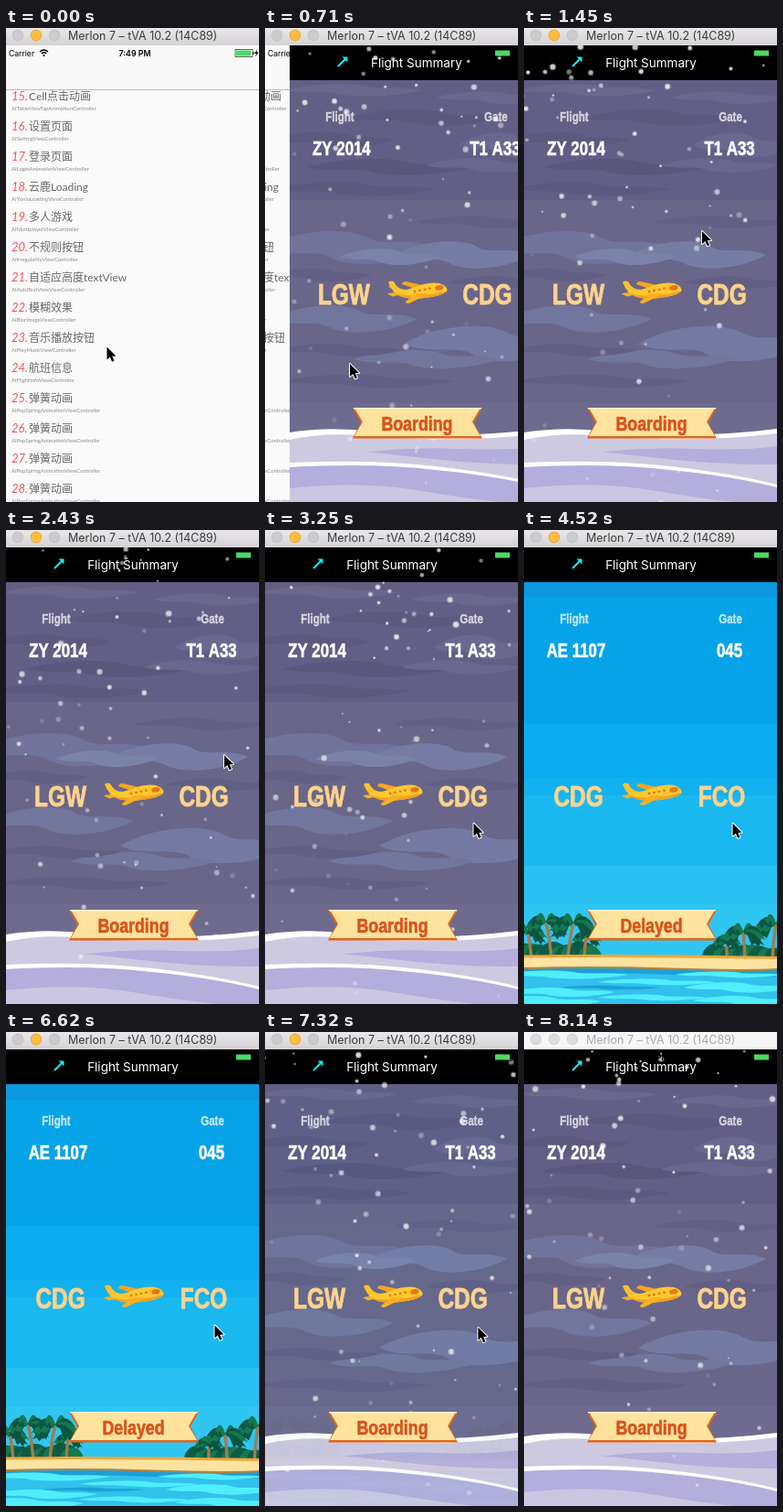
Recreate the animation shown at these times as an HTML page with a canvas. Size 277x518 px, loop 8240 ms.

```html
<!DOCTYPE html>
<html lang="zh">
<head>
<meta charset="utf-8">
<title>Flight Summary</title>
<style>
html, body { margin: 0; width: 100%; height: 100%; overflow: hidden; background: #fafafa; }
canvas { display: block; width: 277px; height: 518px; }
</style>
</head>
<body>
<canvas id="stage" width="277" height="518"></canvas>
<script>
const W = 277, H = 518, LOOP = 8240;
const stage = document.getElementById('stage').getContext('2d');
let g = stage;

const SANS = '"Liberation Sans", Arial, sans-serif';
const UI = 'Inter, sans-serif';
const LIST = 'Lato, "Noto Sans CJK SC", "Noto Sans CJK", sans-serif';
const NARROW = 0.78;   // one condensed face for all flight labels

const clamp = v => Math.max(0, Math.min(1, v));
const easeIn = p => p * p;
const easeOut = p => 1 - (1 - p) ** 2;
const easeInOut = p => p * p * (3 - 2 * p);
const rand = n => { const s = Math.sin(n * 127.1 + 11.7) * 43758.5453; return s - Math.floor(s); };

function rect(color, x, y, w, h) { g.fillStyle = color; g.fillRect(x, y, w, h); }
function shape(color, d) { g.fillStyle = color; g.fill(new Path2D(d)); }
function line(color, width, d) { g.strokeStyle = color; g.lineWidth = width; g.stroke(new Path2D(d)); }
function dot(color, x, y, r) { g.fillStyle = color; g.beginPath(); g.arc(x, y, r, 0, 7); g.fill(); }
function text(s, x, y, font, color, align = 'left') {
  g.font = font; g.fillStyle = color; g.textAlign = align; g.textBaseline = 'alphabetic';
  g.fillText(s, x, y);
}
function layer(paint) {
  const c = document.createElement('canvas');
  c.width = W; c.height = H;
  g = c.getContext('2d');
  paint();
  g = stage;
  return c;
}

// ---- Wintry and sunny backgrounds ----
function streak(color, x, y, w, h) {
  const l = x - w / 2, r = x + w / 2;
  shape(color, `M${l} ${y} C${l + w * .2} ${y - h * .65} ${x} ${y - h * .7} ${x + w * .1} ${y - h * .35}
    S${r - w * .15} ${y - h * .4} ${r} ${y} C${r - w * .2} ${y + h * .65} ${x} ${y + h * .7} ${x - w * .1} ${y + h * .35}
    S${l + w * .15} ${y + h * .4} ${l} ${y}Z`);
}

const winter = layer(() => {
  rect('#625e85', 0, 57, W, 131);
  rect('#696689', 0, 188, W, 221);
  rect('#6e6b8f', 0, 409, W, 109);
  [['#6b678d', 70, 68, 150, 12], ['#6b678d', 225, 76, 130, 12],
   ['#5c587e', 150, 98, 170, 16], ['#5c587e', 50, 122, 130, 15], ['#6b6890', 240, 128, 110, 24],
   ['#5a567c', 110, 152, 180, 16], ['#6a678e', 215, 150, 130, 14], ['#5c587e', 70, 176, 180, 13],
   ['#636085', 215, 212, 150, 12],
   ['#72739a', 65, 240, 190, 32], ['#777ca4', 190, 248, 150, 26], ['#7b82a8', 110, 250, 110, 16],
   ['#625f84', 35, 270, 110, 13], ['#625f84', 235, 278, 120, 12],
   ['#73769c', 60, 318, 160, 26], ['#747aa1', 220, 345, 190, 34], ['#73769c', 150, 362, 160, 18],
   ['#625f84', 55, 352, 140, 12], ['#625f84', 85, 386, 190, 13]].forEach(s => streak(...s));
  shape('#fff', 'M0 442 Q45 435 90 441 Q180 450 277 438 V518 H0Z');
  shape('#cdc9e1', 'M0 450 Q40 441 90 446 Q190 454 277 443 V518 H0Z');
  shape('#b3aedb', 'M30 472 Q110 456 190 460 Q240 462 277 457 V500 H0 Q20 476 30 472Z');
  shape('#cdc9e1', 'M0 462 Q60 459 130 468 Q210 478 277 477 V500 H0Z');
  shape('#fff', 'M0 475 Q90 471 160 479 Q230 487 277 499 V518 H0Z');
  shape('#b3aedb', 'M0 480 Q90 475 160 483 Q230 490 277 502 V518 H0Z');
  shape('#cbc7e2', 'M0 503 Q80 494 145 506 Q185 513 230 518 H0Z');
  rect('#000', 0, 19, W, 38);
});

function palm(x, base, top, lean, size) {
  const cx = x + lean;
  line('#a37b4b', 3.4, `M${x} ${base} Q${x + lean * .2} ${(base + top) / 2} ${cx} ${top}`);
  for (let i = 0; i < 9; i++) {
    const a = Math.PI * (1.12 - i * .155), dx = Math.cos(a) * size, up = Math.sin(a) * size * .5;
    const ex = cx + dx, ey = top - up + size * .42;
    shape(i % 2 ? '#15784f' : '#0b5642', `M${cx} ${top} Q${cx + dx * .5} ${top - up - size * .3} ${ex} ${ey}
      L${cx + dx * .82} ${ey - size * .08} L${cx + dx * .7} ${ey + size * .08} L${cx + dx * .55} ${ey - size * .1}
      L${cx + dx * .4} ${ey} L${cx + dx * .2} ${top + size * .15}Z`);
  }
}
function bushes(from, to, height) {
  for (let x = from, i = 0; x <= to; x += 8, i++)
    dot(i % 2 ? '#15784f' : '#0d5c45', x, 467, height * (.65 + .35 * rand(i + from)));
}

const summer = layer(() => {
  [[57, '#0c98df'], [74, '#06a3e8'], [212, '#0cadf0'], [271, '#13b1ef'], [290, '#19b8f1'],
   [367, '#27c0f1'], [409, '#2fc6f2']].forEach(([y, c]) => rect(c, 0, y, W, H - y));
  bushes(0, 76, 17);
  bushes(210, 277, 15);
  [[8, 468, 438, -4, 22], [30, 468, 428, -6, 25], [66, 468, 444, 2, 17], [48, 468, 429, 6, 27],
   [222, 468, 448, 0, 17], [272, 468, 430, 4, 27], [242, 468, 439, -2, 25]].forEach(p => palm(...p));
  shape('#f2a63a', 'M0 464.500 Q100 463 277 466 V485 H0Z');
  shape('#fce4a0', 'M0 467.500 Q100 466 277 469 V485 H0Z');
  shape('#b9813d', 'M0 478 Q80 476 160 478.500 T277 479 V490 H0Z');
  shape('#1c9fd6', 'M0 480 Q80 478 160 480.500 T277 481 V518 H0Z');
  shape('#31c1ec', 'M0 487 Q80 482 160 486 T277 488 V518 H0Z');
  [[40, 486, 150, 8], [225, 486, 120, 6], [145, 494, 130, 6], [235, 500, 120, 10], [40, 505, 120, 9],
   [140, 511, 120, 6], [20, 515, 130, 10], [240, 514, 110, 9]].forEach(s => streak('#50eefd', ...s));
  streak('#1c9fd6', 95, 500, 110, 4);
  rect('#000', 0, 19, W, 38);
});

// ---- Falling snow ----
function snow(t, alpha) {
  const count = 110;
  for (let i = 0; i < count; i++) {
    const clock = t / 4000 + i / count + 3, turn = Math.floor(clock), age = (clock - turn) * 4;
    const r = k => rand(i * 7 + turn * 631 + k);
    const a = Math.min(1, 1.25 - r(1) * .7 - .16 * age) * alpha;
    const size = 4.1 * (.35 + r(2) * .65 - .03 * age);
    if (a <= 0 || size <= 0) continue;
    const x = r(3) * 300 - 12 + (r(4) - .5) * 55 * age + 4 * age * age;
    const y = -45 + r(5) * 37 + r(6) * 105 * age + 26 * age * age;
    if (y < 19) continue;
    dot(`rgba(255,255,255,${a * .35})`, x, y, size);
    dot(`rgba(255,255,255,${a * .75})`, x, y, size * .7);
  }
}

// ---- Flight page ----
function label(s, x, y, size, color, alpha = 1, sy = 1) {
  g.save();
  g.globalAlpha = alpha;
  g.translate(x, y);
  g.scale(NARROW, sy);
  text(s, 0, size * .36, `bold ${size}px ${SANS}`, color, 'center');
  g.strokeStyle = color;
  g.lineWidth = size * .028;
  g.strokeText(s, 0, size * .36);
  g.restore();
}
function cube(from, to, q, dir, x, y, size, color, half) {
  const p = easeOut(clamp(q / .5)), off = dir * half;
  if (p < 1) label(from, x, y - off * p, size, color, 1, 1 - .9 * p);
  if (p > 0) label(to, x, y + off * (1 - p), size, color, 1, .1 + .9 * p);
}
function slide(from, to, q, dx, dy, x) {
  const out = easeIn(clamp(q / .5)), back = easeIn(clamp((q - .1) / .25));
  label(from, x + dx * out, 290.5 + dy * out, 31.3, '#fcd38c', 1 - out);
  label(to, x + dx * (1 - back), 290.5 + dy * (1 - back), 31.3, '#fcd38c', back);
}
function plane() {
  shape('#f5a623', 'M123 280 Q124 276 130 277.500 L150 282 L140 286Z');
  shape('#fcc22c', 'M108 278 Q109 275.500 114 277 Q118 286 128 286 L124 294 Q113 291 108 278Z');
  shape('#fdc92f', 'M113 288 Q128 287 142 281.500 Q160 276 169 281 Q174 285 172 288 Q166 293 148 295 Q124 298 113 288Z');
  shape('#f3a121', 'M117 291 Q140 295 172 287.500 Q167 293 148 295 Q127 298 117 291Z');
  shape('#f7b128', 'M107 290.500 Q113 288 122 291 L113 293.500Z');
  shape('#f8b124', 'M153 290 L139 290 L127 299 Q127 302 132 300.500Z');
  for (let i = 0; i < 4; i++) dot('#e87420', 137 + i * 5.5, 288 - i * 1.1, 1.4);
  shape('#e8741f', 'M159 283 Q164 279.500 168.500 282 Q169 286 165 286.500 L160 286.500Z');
}
function ribbon() {
  shape('#df661c', 'M69 415 H211 L202 431.500 L211 448.500 H69 L78 431.500Z');
  shape('#fee39f', 'M71 415 H209 L200 430.500 L209 446 H71 L80 430.500Z');
  rect('#fff1cf', 70, 415, 140, 1.5);
}

const FLIGHTS = [
  { no: 'ZY 2014', gate: 'T1 A33', from: 'LGW', to: 'CDG', status: 'Boarding' },
  { no: 'AE 1107', gate: '045', from: 'CDG', to: 'FCO', status: 'Delayed' }
];
const LEAVE = 3790, RETURN = 6665;

function flightPage(t) {
  const leaving = t < RETURN;
  const q = clamp((t - (leaving ? LEAVE : RETURN)) / 730);
  const dir = leaving ? -1 : 1;
  const [a, b] = leaving ? FLIGHTS : [FLIGHTS[1], FLIGHTS[0]];
  const fade = easeInOut(q), sunny = leaving ? fade : 1 - fade;
  g.drawImage(winter, 0, 0);
  g.globalAlpha = sunny;
  g.drawImage(summer, 0, 0);
  g.globalAlpha = 1;
  snow(t, leaving ? 1 - easeOut(q) : easeOut(q));

  line('#18e5ee', 2.2, 'M53 42 L61.500 33.500');
  shape('#18e5ee', 'M57.500 31.500 H63.500 V37.500Z');
  text('Flight Summary', 139, 43, `13.5px ${UI}`, '#fff', 'center');
  label('Flight', 55, 97, 14.8, 'rgba(255,255,255,.7)');
  label('Gate', 226, 97, 14.8, 'rgba(255,255,255,.7)');
  cube(a.no, b.no, q, dir, 57, 131, 21.6, '#fff', 12);
  cube(a.gate, b.gate, q, dir, 225, 131, 21.6, '#fff', 12);
  slide(a.from, b.from, q, 80 * dir, 0, 59.5);
  slide(a.to, b.to, q, 0, 50 * dir, 216.5);
  plane();
  ribbon();
  cube(a.status, b.status, q, dir, 139.5, 432, 22.8, '#d9531c', 16);
}

// ---- List page ----
const ROWS = [
  ['Cell点击动画', 'TableViewTapAnimation'], ['设置页面', 'SettingView'], ['登录页面', 'LoginAnimationView'],
  ['云鹿Loading', 'YunluLoadingView'], ['多人游戏', 'MultiplayerView'], ['不规则按钮', 'IrregularityView'],
  ['自适应高度textView', 'AutoTextViewView'], ['模糊效果', 'BlurImageView'], ['音乐播放按钮', 'PlayMusicView'],
  ['航班信息', 'FlightInfoView'], ...Array(4).fill(['弹簧动画', 'PopSpringAnimationView'])
];
const list = layer(() => {
  rect('#fafafa', 0, 19, W, H);
  ROWS.forEach(([title, name], i) => {
    const y = 74 + i * 33;
    text(15 + i + '.', 6, y + 4.5, `italic 13px ${LIST}`, '#f0575b');
    text(title, 25, y + 4.5, `12px ${LIST}`, '#686868');
    text(`AI${name}Controller`, 6, y + 16, `5.9px ${LIST}`, '#8c8c8c');
  });
  rect('#f9f9f9', 0, 19, W, 48);
  rect('#bcbcbc', 0, 67, W, 1);
});

// ---- Window frame, status bar, pointer ----
function statusBar() {
  text('Carrier', 3, 30.5, `8.6px ${UI}`, '#000');
  text('7:49 PM', 141, 30.5, `600 8.8px ${UI}`, '#000', 'center');
  line('#000', 1.2, 'M37 26 Q41.500 22 46 26 M38.700 28 Q41.500 25.500 44.300 28');
  dot('#000', 41.5, 30, 1.1);
  line('#000', .6, 'M251 23.500 H270 V31.500 H251Z');
  rect('#4cd964', 252, 24.5, 16, 6);
  rect('#000', 270.5, 26, 1, 3);
  shape('#000', 'M275 23.500 L272 28 H274 L273 31.500 L276.500 26.500 H274.500Z');
}
function titleBar(active) {
  const shade = g.createLinearGradient(0, 0, 0, 19);
  shade.addColorStop(0, active ? '#e9e7e9' : '#f6f6f6');
  shade.addColorStop(1, active ? '#d4d2d4' : '#f6f6f6');
  rect(shade, 0, 0, W, 19);
  [13, 33, 53].forEach((x, i) => {
    const on = active && i === 1;
    dot(on ? '#dfa032' : active ? '#bebcbe' : '#d0d0d0', x, 8, 6.2);
    dot(on ? '#fdbd3f' : active ? '#cdcbcd' : '#dcdcdc', x, 8, 5.6);
  });
  text('Merlon 7 – tVA 10.2 (14C89)', 68, 13, `12.5px ${UI}`, active ? '#3c3c3c' : '#a9a9a9');
}

// time, x, y
const PATH = [[0, 110.5, 348.5], [20, 110.5, 348.5], [180, 93, 367], [800, 93, 367], [1450, 195, 222],
  [1800, 195, 222], [2430, 239, 246], [2600, 239, 246], [3250, 228.5, 320.5], [7200, 228.5, 320.5], [7900, 290, 350]];
function pointer(t) {
  let i = 1;
  while (i < PATH.length - 1 && t > PATH[i][0]) i++;
  const [t0, x0, y0] = PATH[i - 1], [t1, x1, y1] = PATH[i];
  const p = easeInOut(clamp((t - t0) / (t1 - t0)));
  g.save();
  g.translate(x0 + (x1 - x0) * p, y0 + (y1 - y0) * p);
  g.lineJoin = 'round';
  const d = 'M0 0 V14 L3.300 11 L5.600 16.300 L8 15.300 L5.700 10.300 L10 10Z';
  line('#fff', 2, d);
  shape('#000', d);
  g.restore();
}

function draw(now) {
  const t = now % LOOP;
  const push = 1 - (1 - clamp((t - 430) / 520)) ** 3;
  g.clearRect(0, 0, W, H);
  if (push < 1) g.drawImage(list, -W * .3 * push, 0);
  if (push > 0) {
    g.save();
    g.translate(W * (1 - push), 0);
    g.beginPath();
    g.rect(0, 19, W, H);
    g.clip();
    flightPage(t);
    g.restore();
  }
  statusBar();
  titleBar(t < 8140);
  pointer(t);
}

const start = performance.now();
function tick() {
  draw(performance.now() - start);
  requestAnimationFrame(tick);
}
tick();
</script>
</body>
</html>
```
